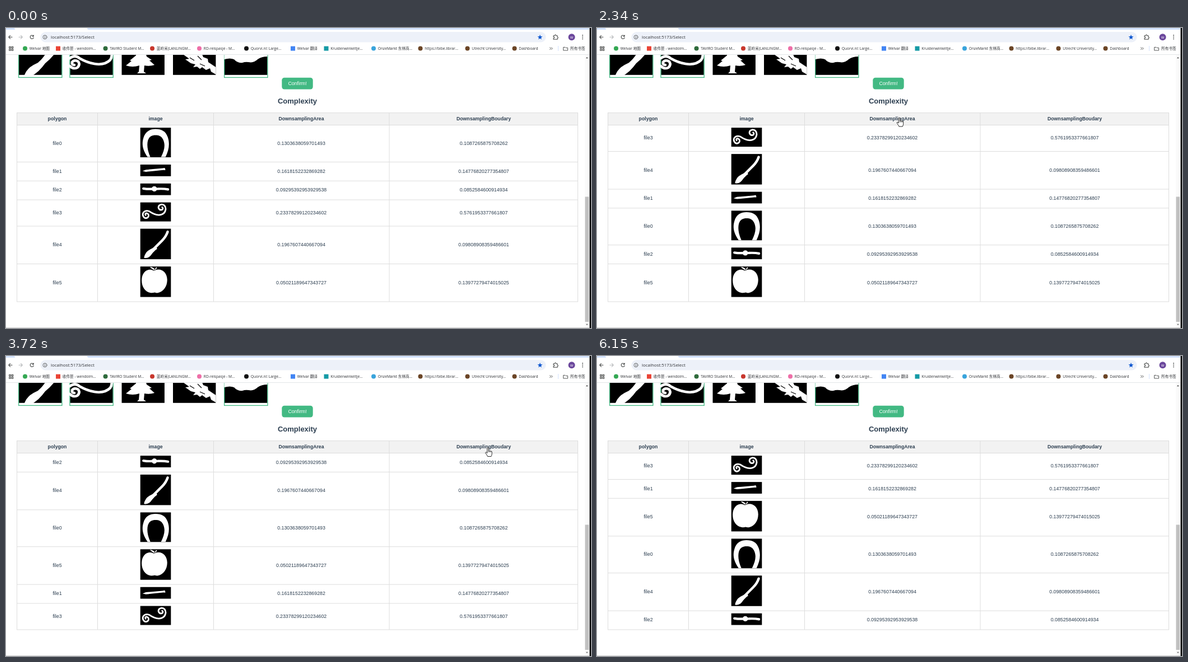
These frames come from a looping animation (1044x536 px, 6220 ms). An HTML page:

```html
<!DOCTYPE html>
<html lang="en">
<head>
<meta charset="utf-8">
<title>Complexity table</title>
<style>
html, body { margin: 0; width: 100%; height: 100%; overflow: hidden; background: #fff; }
svg { display: block; width: 1044px; height: 536px; }
.ui { font: 6.65px "Open Sans", "Noto Sans CJK SC", "Noto Sans CJK", sans-serif; fill: #303236; }
.page { font: 8.8px "Liberation Sans", Arial, sans-serif; fill: #2c3e50; text-anchor: middle; }
.bold { font-weight: 700; }
.line { fill: none; stroke: #454746; stroke-width: 1.1; stroke-linecap: round; stroke-linejoin: round; }
</style>
</head>
<body>
<svg viewBox="0 0 1044 536">
  <defs>
    <clipPath id="view"><rect y="48" width="1033" height="488"/></clipPath>
  </defs>
  <rect width="1044" height="536" fill="#fff"/>

  <!-- browser bar -->
  <path d="M0 0H13Q16 0 16 3H0ZM145 0H1041V3H148Q145 3 145 0Z" fill="#d3e3fd"/>
  <rect x="61.5" y="7" width="902" height="18.5" rx="9.2" fill="#edf1f9"/>
  <g class="line">
    <path d="M11 16.2H4.8M7.6 13.3L4.7 16.2L7.6 19.1"/>
    <path d="M23 16.2H29.2M26.4 13.3L29.3 16.2L26.4 19.1" stroke="#b4b6b8"/>
    <path d="M48.9 14.5A3.1 3.1 0 1 0 49.2 17.2M49.2 12.8V14.9H47"/>
    <circle cx="69.5" cy="16.3" r="3.5" stroke-width=".8"/>
    <path d="M69.5 16V18M69.5 14.5V14.6" stroke-width=".9"/>
    <path d="M977 13.7H979.2Q979.4 12 980.5 12T981.8 13.7H984V16Q985.2 16.2 985.2 17.3T984 18.6V20.3H977V18.4Q978.7 18 978.7 17T977 15.8Z"/>
    <path d="M995 34.4H998L999 35.4H1002.5V40H995Z" stroke-width=".9"/>
    <path d="M970.5 34.7L972.4 36.6L970.5 38.5M973.3 34.7L975.2 36.6L973.3 38.5" stroke-width=".9"/>
  </g>
  <path d="M953 11.7L954.2 15L957.5 15.1L954.9 17.2L955.8 20.5L953 18.6L950.2 20.5L951.1 17.2L948.5 15.1L951.8 15Z" fill="#0b57d0"/>
  <circle cx="1009.5" cy="16.3" r="6" fill="#6b479c"/>
  <g fill="#454746">
    <circle cx="1029" cy="13" r=".9"/><circle cx="1029" cy="16.2" r=".9"/><circle cx="1029" cy="19.4" r=".9"/>
  </g>
  <rect x="985" y="32" width="1" height="9" fill="#d3e3fd"/>
  <g class="ui">
    <text x="80" y="19.1" style="font-size:7.9px">localhost:5173/Select</text>
    <text x="1009.5" y="18.5" text-anchor="middle" style="font-size:6.5px;fill:#fff">w</text>
    <text x="1007" y="39.2">所有书签</text>
    <g id="marks"></g>
  </g>
  <g id="apps" class="line" stroke-width=".9"></g>
  <rect y="47" width="1041" height="1" fill="#e3e5e8"/>

  <!-- picked pictures, scrolled half away -->
  <g clip-path="url(#view)">
    <g id="tiles"></g>
    <g fill="#fff">
      <path d="M70 47H86Q79 56 70 63Q65 70 58 77Q53 81 49 84H33Q36 76 43 70Q50 65 57 62Q66 54 70 47Z"/>
      <path d="M214 67L224 59L221 58L232 49V47H250L251 51L260 57L256 58L265 66Q256 69 247 67L246 78L250 81H234L237 78L238 67Q226 71 214 67Z"/>
      <path d="M316 47H350L352 52L360 55L361 61L374.5 70V83L366 78L364 72L357 75L350 70L346 73L341 69L334 70L338 65L330 63L320 56L327 55Z"/>
      <path d="M389.5 47H466.5V51Q456 51 449 56Q442 63 433 61Q427 60 422 62Q413 63 407 56Q400 53 389.5 56Z"/>
    </g>
    <path d="M328 53L336 58M342 50L349 57M346 64L355 68" stroke="#000" stroke-width="1.2"/>
    <g fill="none" stroke="#fff" stroke-width="4.6" stroke-linecap="round">
      <path d="M114 54Q123 47 131 54Q145 62 158 64Q176 67 186 57Q190 51 188 45"/>
      <path d="M114 68Q120 74 127 71Q133 66 129 60Q122 56 118 61Q117 66 122 66"/>
    </g>
  </g>

  <rect x="492.3" y="88.8" width="55.4" height="20.8" rx="4.5" fill="#42b983"/>
  <g class="page">
    <text x="520" y="102" style="fill:#fff">Confirm!</text>
    <text x="520" y="134.6" class="bold" style="font-size:13px">Complexity</text>
    <rect x="19" y="151" width="1002" height="22.5" fill="#f2f2f2"/>
    <g id="head" class="bold" style="font-size:8.7px"></g>
    <g id="rows"></g>
    <path d="M19 151.5H1021M19 173.5H1021M19.5 151V489M163.5 151V489M370.5 151V489M684 151V489M1020.5 151V489" stroke="#ddd" fill="none"/>
  </g>

  <!-- scroll bar and window edge -->
  <rect x="1033" y="48" width="8" height="488" fill="#fafafa"/>
  <rect x="1033.4" y="301.5" width="6.8" height="223.5" fill="#c1c1c1"/>
  <path d="M1034.8 54.3L1036.8 51.8L1038.8 54.3Z" fill="#555"/>
  <path d="M1034.8 528.7L1036.8 531.2L1038.8 528.7Z" fill="#777"/>
  <rect y="535" width="1041" height="1" fill="#d0d0d0"/>
  <rect x="1041.5" width="2.5" height="536" fill="#000"/>

  <!-- input method panel -->
  <g id="panel">
    <path d="M965 243.5A4.3 4.3 0 1 1 961.5 250.5A5 5 0 0 0 965 243.5Z"/>
    <g stroke="#000" fill="none">
      <path d="M1002 259L1021 240M1011 279L1029 262" stroke-dasharray="8 2 5 2"/>
      <path d="M958 271L974 254" stroke-dasharray="4 2"/>
      <path d="M988 243C998 256 973 264 974 282C974 296 981 302 985 309" stroke-width="3"/>
      <path d="M991 245C1000 259 983 267 981 281Q980 293 985 300"/>
      <path d="M993 249C1001 262 991 266 990 276M1000 267C1002 274 1008 278 1016 278" stroke-width="2"/>
      <path d="M1017 277C1024 283 1016 287 1024 293C1030 296 1031 285 1030 280C1037 287 1036 301 1021 310" stroke-width="2.6"/>
    </g>
    <path d="M983 311V287H985V281L989 275L993 281V290H996V283H1003V289H1006V282H1008L1010 278L1012 282V290H1017V286H1021V291H1026V305L1022 311Z"/>
    <path d="M988 283V287M998 287H1002M998 291H1002M986 293H991M986 298H991M1008 287V291M1014 295V302M1019 290V294M998 297V302M1003 297V302" stroke="#fff"/>
    <path d="M960 280L963 278Q964.5 280 966 278L969.5 280L968 283L967 282.5V286.5H962V282.5L961 283Z"/>
    <g id="stars"></g>
    <g class="bold" style="font:700 9.2px 'Noto Sans CJK SC','Noto Sans CJK',sans-serif" text-anchor="middle">
      <text x="964.5" y="298.4">中</text><text x="964.5" y="310.4">简</text>
    </g>
  </g>

  <g id="cursor" fill="#fff" stroke="#111" stroke-width=".9" stroke-linejoin="round">
    <path id="arrow" d="M0 0V12.5L3 9.9L5 14.3L7 13.4L5.1 9.2H9Z"/>
    <g id="hand">
      <path d="M-1.2 1Q0-.9 1.2 1V6Q2.2 5.2 3.2 6.2Q4.3 5.5 5.3 6.6Q6.8 6 7.2 7.8V11.5Q7 14 5.8 16H-.5Q-1.5 13.5-3.8 10.5Q-5 8.5-3.5 8.2Q-2.2 8.3-1.2 10Z"/>
      <path d="M1.2 6V8.5M3.2 6.2V8.6M5.3 6.6V8.8" fill="none" stroke-width=".7"/>
    </g>
  </g>
</svg>
<script>
const LOOP = 6220;
const $ = id => document.getElementById(id);
const text = (x, y, s, more = '') => `<text x="${x}" y="${y}" ${more}>${s}</text>`;
const fill = d => `<path d="${d}" fill="#fff"/>`;
const stroke = (d, w) => `<path d="${d}" fill="none" stroke="#fff" stroke-width="${w}" stroke-linecap="round"/>`;

// bookmarks: icon x, icon colour, round?, label
const marks = [
  [34, '#34a853', 1, 'Welvar 地图'],
  [93, '#ea4335', 0, '收件匣 - wendolm...'],
  [177.5, '#2f6b3c', 1, 'TAVIRO Student M...'],
  [261, '#c8372d', 1, '蓝岭米(LANLINGM...'],
  [345, '#ee6fa8', 1, 'RD-reispasje - M...'],
  [429, '#111', 1, 'Quorvi.nl: Large...'],
  [512, '#4285f4', 0, 'Welvar 翻译'],
  [571.5, '#159aa5', 0, 'Kruidenwinkeltje...'],
  [656, '#39a4dc', 1, 'OnzeMarkt 东林商...'],
  [739.5, '#6b4526', 1, 'https://bibe.librar...'],
  [823.5, '#6b4526', 1, 'Utrecht University...'],
  [907.5, '#6b4526', 1, 'Dashboard']
];
$('marks').innerHTML = marks.map(([x, color, round, label]) =>
  `<rect x="${x - 4}" y="32.6" width="8" height="8" rx="${round ? 4 : 0}" fill="${color}"/>` +
  text(x + 7.8, 39.2, label)).join('');

$('apps').innerHTML = [0, 1, 2, 3].map(i =>
  `<rect x="${5.7 + i % 2 * 4.4}" y="${33.3 + (i >> 1) * 4.4}" width="2.6" height="2.6"/>`).join('');

$('tiles').innerHTML = [22, 113.3, 206.5, 298, 389].map((x, i) => {
  const picked = i < 2 || i > 3;
  return `<rect x="${x + (picked ? 1 : 0)}" y="40" width="76.4" height="43.8"/>` +
    (picked ? `<rect x="${x + .6}" y="40" width="77.3" height="48.4" fill="none" stroke="#42b983" stroke-width="1.3"/>` : '');
}).join('');

$('stars').innerHTML = [[998, 263, 4], [1012, 277, 3], [958, 271, 2.5]].map(([x, y, r]) =>
  `<path d="M${x} ${y - r}Q${x} ${y} ${x + r} ${y}Q${x} ${y} ${x} ${y + r}Q${x} ${y} ${x - r} ${y}Q${x} ${y} ${x} ${y - r}Z" stroke="#000" stroke-width=".6"/>`).join('');

$('head').innerHTML = [[91.5, 'polygon'], [267, 'image'], [527, 'DownsamplingArea'], [852.5, 'DownsamplingBoudary']]
  .map(([x, s]) => text(x, 165, s)).join('');

const files = [
  { h: 65.9, area: '0.1303638059701493', edge: '0.1087265875708262',
    art: fill('M13 52.5C4 40 2 29 6 17C10 6 18 2.5 27 2.5C38 2.5 45 6 49 17C53 29 51 40 45 52.5H37C43 41 45 31 41 22C38 15 33 13.5 27 13.5C20 13.5 16 16 13.5 23C11 33 14 44 18 52.5Z') },
  { h: 33.8, area: '0.1618152232869282', edge: '0.14776820277354807',
    art: fill('M4 11.6L10 9.2L40 6.6L43.5 5.9Q45 8 44.5 10L41 9.8L10 13Z') },
  { h: 33.8, area: '0.09295392953929538', edge: '0.0852584600914934',
    art: stroke('M5.5 9Q14 10.2 20 9.8L31 9.6Q42 9 49.5 10.6', 4.2) + '<circle cx="25" cy="9.6" r="4.7" fill="#fff"/>' },
  { h: 47, area: '0.23378299120234602', edge: '0.5761953377661807',
    art: stroke('M9.5 22.8Q8 20 11 19.2Q15.5 20 14.6 25Q12 29.5 7.5 27.5Q2.5 23 5.5 18Q10 13 17 16.5Q25 22 33 22.5Q44 22 45.3 12Q45 4 38 3.6Q31.5 5 32.5 10Q34.5 14.5 39 13Q41.5 10.5 39 8.6', 2.8) },
  { h: 67.5, area: '0.1967607440667094', edge: '0.09808908359486601',
    art: stroke('M48.8 5.4Q46 14 39 21L23 37', 4.4) + fill('M28 31C22 36 14 37 10 43.5Q7 48 6.5 52Q13 54 18.5 48C23 42 26 39 30 36Z') },
  { h: 67.5, area: '0.05021189647343727', edge: '0.13977279474015025',
    art: fill('M24 7.5C14 2 3 9 2.5 24C2 38 11 46.5 19 47.2Q23 47.4 25.5 46.5Q29 47.8 32 47C41 45 48 36 48 24C48 9 36 2.5 27 6.5Z') +
      fill('M17 1Q23 .8 26 5.5L24.5 6.5Q21 5 17 1ZM26 5.5L28 1.5L30 2L27.3 6Z') }
];
const rows = files.map((f, i) => {
  const g = document.createElementNS('http://www.w3.org/2000/svg', 'g');
  const base = f.h / 2 + 2.4;
  g.innerHTML = text(91.5, base, 'file' + i) + text(527, base, f.area) + text(852.5, base, f.edge) +
    `<g transform="translate(239.7 4.6)"><rect width="54.6" height="${f.h - 13}" fill="#000"/>${f.art}</g>` +
    `<rect x="19" y="${f.h - .5}" width="1002" height="1" fill="#ddd"/>`;
  $('rows').append(g);
  return g;
});

// sorting clicks: start, key, direction
const sorts = [[1150, 'area', 1], [2340, 'area', -1], [3520, 'edge', 1], [4320, 'edge', -1]];

// pointer path: time, x, y
const path = [
  [70, 1003, 515], [140, 985, 450], [210, 945, 360], [280, 885, 270], [350, 815, 205], [430, 735, 170],
  [510, 660, 168], [590, 600, 182], [680, 552, 200], [750, 535, 189], [820, 533, 177], [950, 538, 161],
  [1350, 538.5, 160], [1540, 538.5, 160], [1610, 538.5, 159.5], [1740, 538.5, 159.5], [1810, 539.5, 160],
  [2400, 539.5, 160], [2480, 562, 177], [2600, 640, 208], [2740, 740, 220], [2890, 826, 201],
  [2960, 836, 187], [3100, 846, 175], [3320, 860, 163.5], [4000, 860, 163.5], [4120, 870.5, 163],
  [4500, 870.5, 163], [4700, 864, 175], [4940, 853, 189], [5010, 855, 193], [5150, 876, 232],
  [5300, 925, 330], [5450, 972, 435], [5610, 1001, 518], [5680, 1003, 525], [5750, 1003, 537]
];
function pointAt(t) {
  const i = path.findIndex(p => p[0] > t);
  if (i < 1) return null;
  const [a, b] = [path[i - 1], path[i]];
  const k = (t - a[0]) / (b[0] - a[0]);
  return [a[1] + (b[1] - a[1]) * k, a[2] + (b[2] - a[2]) * k];
}
const show = (el, on) => el.setAttribute('visibility', on ? 'visible' : 'hidden');

function draw(t) {
  const order = files.map((f, i) => i);
  const sort = sorts.filter(s => s[0] <= t).pop();
  if (sort) order.sort((a, b) => sort[2] * (files[a][sort[1]] - files[b][sort[1]]));
  let y = 173.5;
  for (const i of order) {
    rows[i].setAttribute('transform', `translate(0 ${y.toFixed(1)})`);
    y += files[i].h;
  }
  show($('panel'), t >= 70 && t < 1150);

  const p = pointAt(t);
  const over = p && p[1] > 151 && p[1] < 173.5;
  show($('arrow'), p && !over);
  show($('hand'), over);
  if (p) $('cursor').setAttribute('transform', `translate(${p[0].toFixed(1)} ${p[1].toFixed(1)})`);
}

const start = performance.now();
function tick() {
  draw((performance.now() - start) % LOOP);
  requestAnimationFrame(tick);
}
tick();
</script>
</body>
</html>
```
